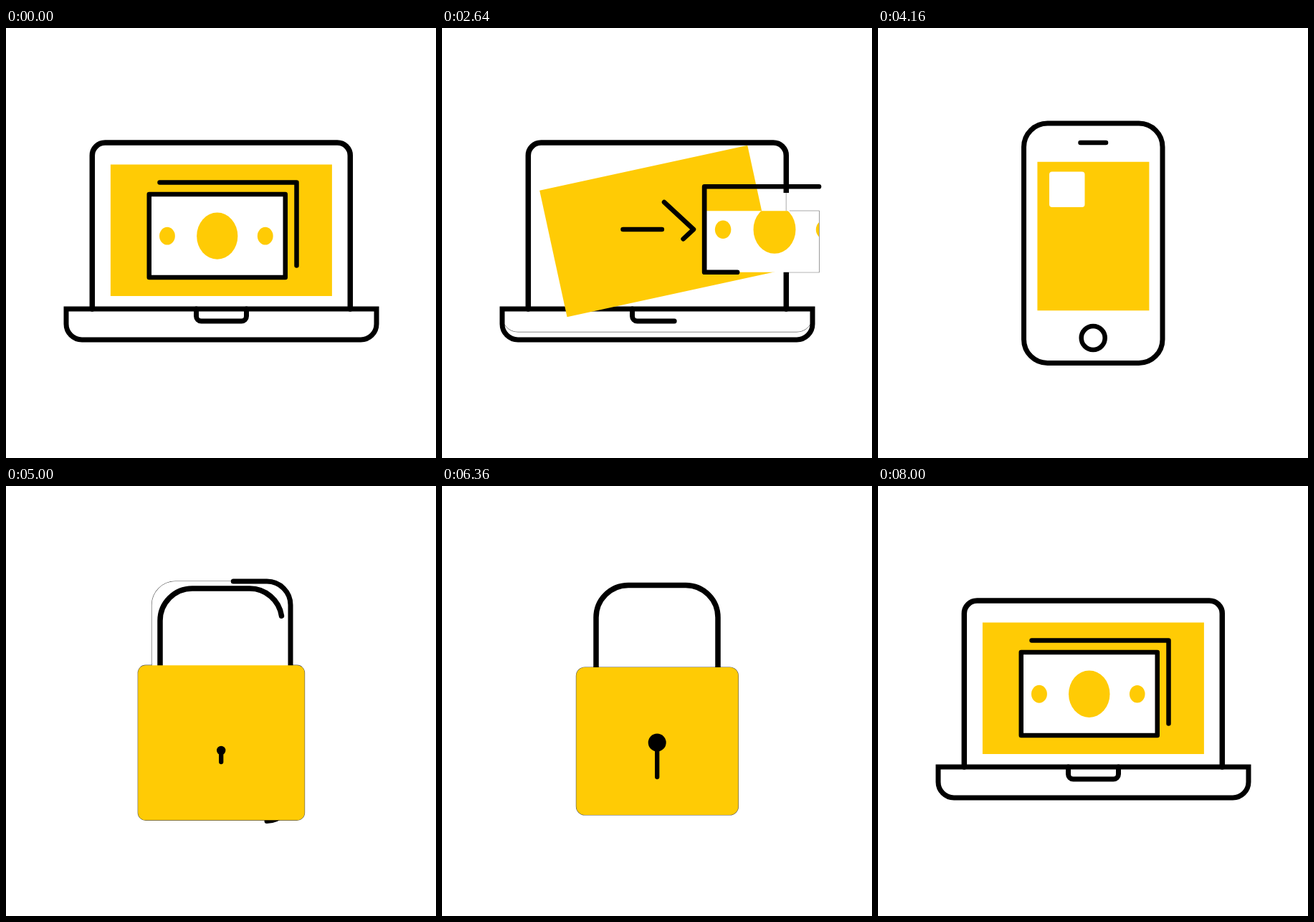
An HTML page with a canvas for the animation above (8040 ms loop, 600 by 600 pixels).

```html
<!DOCTYPE html>
<html lang="en">
<head>
<meta charset="utf-8">
<title>Laptop, phone, lock</title>
<style>
html, body { margin: 0; width: 100%; height: 100%; overflow: hidden; background: #fff; }
canvas { display: block; width: 600px; height: 600px; }
</style>
</head>
<body>
<canvas id="stage" width="600" height="600"></canvas>
<script>
const ctx = document.getElementById('stage').getContext('2d');
const YELLOW = '#ffcb05', LOOP = 8040, STEP = 40, SPAN = 840;
const SEND = 600, RECEIVE = 1440, PHONE = 2600, ICON = 3440, LOCK = 4600, SHUT = 5440, LAPTOP = 6720;

const paths = {
  lid: 'M120.3 392V178a18 18 0 0 1 18-18H462.3a18 18 0 0 1 18 18V392',
  base: 'M84 392H517V413a22 22 0 0 1-22 22H106a22 22 0 0 1-22-22Z',
  notch: 'M265.5 392V402a7 7 0 0 0 7 7H328.5a7 7 0 0 0 7-7V392',
  back: 'M214.5 215.5H405.5V331.5',
  shaft: 'M252.5 281H332',
  head: 'M310 243L351 281L311 318',
  phone: 'M364 467.5a33 33 0 0 0 33-33V166a33 33 0 0 0-33-33H236.5a33 33 0 0 0-33 33V434.5a33 33 0 0 0 33 33Z',
  speaker: 'M282.5 160H318',
  home: 'M316.7 432.5a16.5 16.5 0 1 0-33 0a16.5 16.5 0 1 0 33 0',
  shackle: 'M215 272V188a45 45 0 0 1 45-45H340a45 45 0 0 1 45 45V272'
};

// Yellow panel: width, height, centre y, corner radius, angle
const panels = {
  laptop: [309, 183.5, 282.2, 0, 0],
  phone: [156, 207.5, 290.6, 0, 0],
  open: [236, 209, 369.6, 12, 0],
  shut: [226, 206, 356, 12, 0]
};

const clamp = x => Math.max(0, Math.min(1, x));
const mix = (a, b, p) => a + (b - a) * p;
const mixAll = (a, b, p) => a.map((v, i) => mix(v, b[i], p));
const turned = ([w, h, y, r]) => [h, w, y, r, 90];
const easeOut = x => 1 - (1 - clamp(x)) ** 3;
const smooth = x => x * x * (3 - 2 * x);
const spring = ms => ms <= 0 ? 0 : 1 - Math.exp(-ms / 240) * Math.cos(ms / 140);

const ruler = document.createElementNS('http://www.w3.org/2000/svg', 'path');
function pathLength(d) {
  ruler.setAttribute('d', d);
  return ruler.getTotalLength();
}

function line(d, width, to, from = 0, join = 'round') {
  if (to - from < .001) return;
  ctx.save();
  ctx.lineWidth = width;
  ctx.lineCap = 'round';
  ctx.lineJoin = join;
  if (to < 1 || from > 0) {
    const len = pathLength(d);
    ctx.setLineDash([len * (to - from), len * 2]);
    ctx.lineDashOffset = -len * from;
  }
  ctx.stroke(new Path2D(d));
  ctx.restore();
}

function roundBox(x, y, w, h, r) {
  const p = new Path2D();
  if (w > .3 && h > .3) p.roundRect(x, y, w, h, r);
  return p;
}

function fill(shape, color) {
  ctx.fillStyle = color;
  ctx.fill(shape);
}

function dot(x, y, rx, ry) {
  ctx.beginPath();
  ctx.ellipse(x, y, rx, ry, 0, 0, 7);
  ctx.fill();
}

function draw(T) {
  const part = (start, a = 0, b = 1) => easeOut(((T - start) / SPAN - a) / (b - a));
  const swell = start => Math.sin(Math.PI * clamp((T - start) / SPAN));
  const send = part(SEND), receive = part(RECEIVE, 0, .92);
  const shut = smooth(clamp((T - SHUT) / 800));
  const dip = 7 * Math.sin(Math.PI * clamp(((T - SHUT) / 800 - .12) / .4)) ** 2;

  // Panel
  let panel;
  if (T < PHONE) panel = panels.laptop;
  else if (T < LOCK) panel = mixAll(turned(panels.laptop), panels.phone, part(PHONE));
  else if (T < SHUT) panel = mixAll(panels.phone, panels.open, part(LOCK));
  else if (T < LAPTOP) panel = mixAll(panels.open, panels.shut, shut);
  else panel = mixAll(turned(panels.shut), panels.laptop, part(LAPTOP));
  const [w, h, cy, r, angle] = panel;
  const size = 1 + .038 * swell(PHONE) + .035 * swell(LOCK);
  const place = new DOMMatrix().translate(300.4, cy + dip + swell(PHONE)).rotate(angle).scale(size);
  const screen = new Path2D();
  screen.addPath(roundBox(-w / 2, -h / 2, w, h, r), place);

  // Banknote
  const home = T >= LAPTOP;
  const cx = home ? 294.75 : mix(mix(294.75, 136, send), 464, receive);
  const ny = home ? 290 : mix(290, 281, send);
  const zoom = home ? 1 : mix(1, 1.03, send);
  const noteLeft = cx - 95 * zoom, noteRight = cx + 95 * zoom;
  const left = Math.max(77, noteLeft), right = Math.min(526, noteRight);
  const top = ny - 58 * zoom, bottom = ny + 58 * zoom;
  const noteFill = 1 - part(PHONE, 0, .45) + part(LAPTOP, .19);
  const noteLine = 1 - part(PHONE, 0, .5) + part(LAPTOP, .03);
  const paper = roundBox(left, mix(bottom, top, noteFill), right - left, (bottom - top) * noteFill, 0);
  let noteEdge = `M${right} ${top}V${bottom}H${left}V${top}Z`;
  if (noteLeft < left) noteEdge = `M${left} ${top}H${right}V${bottom}H${left}`;
  else if (noteRight > right) noteEdge = `M${right} ${top}H${left}V${bottom}H${right}`;

  // White bodies
  const lidFill = 1 - part(PHONE, .31) + part(LAPTOP, .32);
  const baseFill = 1 - part(PHONE, 0, .5) + part(LAPTOP, .4);
  const phoneFill = part(PHONE, .1, .6) - part(LOCK, .31);
  const bodies = [
    roundBox(120.3, 160, 360, 232 * lidFill, [18, 18, 0, 0]),
    roundBox(84, 392, 433, 43 * baseFill, [0, 0, 22, 22]),
    roundBox(203.5, 133, 193.5, 334.5 * phoneFill, 33)
  ];

  ctx.fillStyle = '#fff';
  ctx.fillRect(0, 0, 600, 600);

  // Hairlines show only where a body meets the empty background
  ctx.strokeStyle = '#555';
  ctx.lineWidth = 1.2;
  for (const shape of [...bodies, screen, paper]) ctx.stroke(shape);
  ctx.strokeStyle = '#000';
  bodies.forEach(shape => fill(shape, '#fff'));

  function slot(x, open) {
    if (open < .002) return;
    const half = 74.5 * open;
    ctx.fillStyle = '#fff';
    ctx.fillRect(x - 4.5, 281 - half, 9, half * 2);
    ctx.fillStyle = '#888';
    ctx.fillRect(x - .5, 281 - half, .7, half * 2);
  }

  function laptop() {
    line(paths.lid, 7.5, 1 - part(PHONE, .515) + part(LAPTOP, .08));
    slot(120.3, send - receive);
    slot(480.3, receive - part(PHONE, 0, .4));
    line(paths.base, 7, 1 - part(PHONE, .45) + part(LAPTOP, .331), 0, 'miter');
    line(paths.notch, 7, 1 - part(PHONE, 0, .5) + part(LAPTOP, .45));
  }

  if (!home) laptop();
  line(paths.phone, 7, part(PHONE, .19) - part(LOCK, .3));
  line(paths.speaker, 6.5, part(PHONE, .65) - part(LOCK, 0, .5));
  line(paths.home, 6.5, part(PHONE, .54) - part(LOCK, 0, .7));

  ctx.save();
  ctx.translate(0, -4.5 * shut);
  line(paths.shackle, 7.5, part(LOCK, .15), part(LAPTOP, .16));
  ctx.restore();

  fill(screen, YELLOW);

  const icon = 49.5 * (part(ICON, 0, .86) - part(LOCK, 0, .35));
  fill(roundBox(263.75 - icon / 2, 225.3 - icon / 2, icon, icon, 4), '#fff');

  // Keyhole
  const hole = mix(13, 12.5, shut) * (part(LOCK, .35) - part(LAPTOP, .3));
  const keyY = 369 - 11 * shut + dip;
  ctx.fillStyle = '#000';
  if (hole > 0) dot(300.2, keyY, hole, hole);
  line(`M300.2 ${keyY}v48`, 6.3, part(LOCK, .4) - part(LAPTOP));

  if (home) laptop();

  line(paths.back, 6.5, 1 - part(SEND, 0, .6) + part(LAPTOP, 0, .53));
  line(paths.shaft, 6.5, part(SEND, .2, .9) - part(PHONE, 0, .4));
  line(paths.head, 6.5, part(SEND, .3, .95) - part(PHONE, 0, .4));

  // Banknote paper, ellipses and edge
  ctx.save();
  fill(paper, '#fff');
  ctx.clip(paper);
  ctx.fillStyle = YELLOW;
  const puff = delay => home ? spring(T - LAPTOP - delay) : zoom;
  const mark = (dx, rx, ry, s) => dot(cx + dx * zoom, ny + .2, rx * s, ry * s);
  mark(-69.8, 10.9, 12.4, puff(0));
  mark(0, 28.6, 32.6, puff(0));
  mark(67, 10.9, 12.4, puff(280));
  ctx.restore();
  line(noteEdge, 6.5 * zoom, noteLine);
}

function tick(now) {
  draw(Math.floor((now % LOOP) / STEP) * STEP);
  requestAnimationFrame(tick);
}
tick(performance.now());
</script>
</body>
</html>
```
